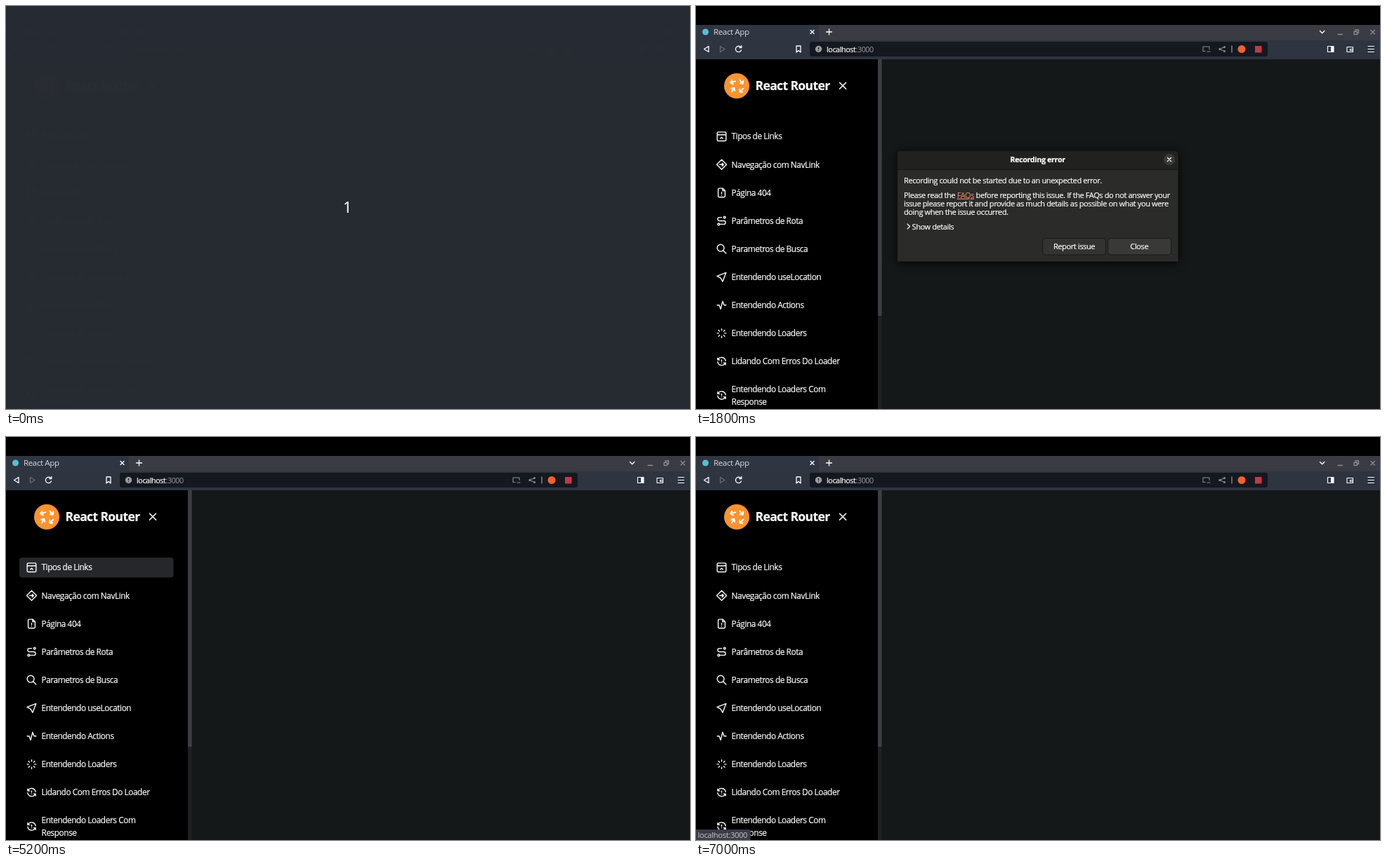
An HTML page that plays this animation: 974 by 575 pixels, repeating every 8000 ms.

```html
<!DOCTYPE html>
<html lang="pt">
<head>
<meta charset="utf-8">
<title>React App</title>
<style>
  html, body { margin: 0; width: 100%; height: 100%; overflow: hidden; background: #000; }
  svg { display: block; width: 974px; height: 575px; }
  text { font-family: "Open Sans", "Noto Sans", sans-serif; letter-spacing: -.035em; fill: #fff; stroke: #fff; stroke-width: .2; white-space: pre; }
  .soft { stroke: none; }
  .line { fill: none; stroke: #fff; stroke-width: 1.3; stroke-linecap: round; stroke-linejoin: round; }
  .icon { fill: none; stroke: #fff; stroke-width: 2; stroke-linecap: round; stroke-linejoin: round; }
  .dim { stroke: #8b8d92; }
  .mid { text-anchor: middle; }
</style>
</head>
<body>
<svg viewBox="0 0 974 575">
  <!-- browser frame -->
  <rect width="974" height="575"/>
  <rect y="27" width="974" height="23" fill="#3b3b43"/>
  <path d="M0 27H171q4 0 4 4V50H0z" fill="#2f3541"/>
  <rect y="49" width="974" height="27" fill="#2e3440"/>
  <rect x="162" y="51" width="652" height="21" rx="3" fill="#15181e"/>
  <circle cx="13.500" cy="37" r="4.500" fill="#53bfd8"/>
  <text class="soft" x="25" y="41" font-size="11.600" style="fill:#d9dbe0">React App</text>
  <g class="line">
    <path d="M163 34.500l5 5m0-5l-5 5M185.500 37h8m-4-4v8M888.500 35.500l3.200 3.200 3.200-3.200"/>
    <path class="dim" d="M914 40.500h6.500M961 34.500l5.500 5.500m0-5.500l-5.500 5.500M937 36.500h4.500v4h-4.500zM939 36v-2h4.500v4.500h-2"/>
    <path d="M18 57.500v8l-6.500-4zM143 57h6v9l-3-2.500-3 2.500z"/>
    <path d="M34.500 57.500v8l6.500-4z" stroke="#666b75"/>
    <path d="M64 59a4.200 4.200 0 1 0 .5 4M64.800 56.500v3h-3"/>
    <path class="dim" stroke-width="1.100" d="M725 64.500h-3v-6.500h9v3.500M728 65h4M752.500 58.500l-7 3 7 3"/>
    <path d="M899.500 57.500h8.500v8h-8.500zM927 58.500h8.500v7h-8.500zM931.500 61.500h4v2h-4zM957 57.500h8.500M957 61.500h8.500M957 65.500h8.500" stroke-width="1.100"/>
  </g>
  <g fill="#8b8d92">
    <circle cx="752.500" cy="58.500" r="1.500"/>
    <circle cx="745.800" cy="61.500" r="1.500"/>
    <circle cx="752.500" cy="64.500" r="1.500"/>
  </g>
  <path d="M904 57.500h4v8h-4z" fill="#fff"/>
  <path d="M763 56.500v10" stroke="#b5b7bc"/>
  <circle cx="174.500" cy="61.500" r="4.700" fill="#9a9ca1"/>
  <path d="M174.500 59v3m0 1.300v1" stroke="#15181e" stroke-width="1.200"/>
  <text x="186" y="65.500" font-size="10.700">localhost<tspan class="soft" fill="#9a9ca1">:3000</tspan></text>
  <circle cx="777" cy="61.500" r="5.500" fill="#f4602d"/>
  <rect x="796" y="57" width="9.500" height="9.500" fill="#c23a45"/>

  <!-- page -->
  <rect x="264" y="76" width="710" height="499" fill="#141819"/>
  <rect x="259" y="76" width="5.500" height="499" fill="#1e2123"/>
  <rect x="259" y="76" width="5.500" height="366" fill="#3d3f43"/>
  <circle cx="58" cy="114" r="18" fill="#fd932f"/>
  <path class="icon" transform="translate(46.200 101.800)" d="M20 21h-4v-4M16 21l5-5M6.500 9.500L3 7.500 5 4M3 7.500l6.800-1.900M4 16l4-1 1 4M8 15l-3.500 6M21 5l-.5 4-4-.5M20.500 9L16 3.500"/>
  <text x="84.500" y="120" font-size="17.500" font-weight="700">React Router</text>
  <path class="line" style="stroke-width:1.600" d="M204.500 109.300l9 9m0-9l-9 9"/>
  <rect id="hover" x="19" y="172" width="219.500" height="28.500" rx="4" fill="#25272a"/>
  <g id="menu"></g>
  <g id="status">
    <path id="bubble" fill="#3b3c44"/>
    <text id="link" class="soft" x="2.500" y="571.500" font-size="11.300" style="fill:#c3c5ca"></text>
  </g>

  <!-- recorder -->
  <rect id="veil" width="974" height="575" fill="#272c33"/>
  <text id="count" class="mid" x="486" y="295" font-size="21">1</text>
  <g id="hints" class="mid">
    <text x="486.700" y="147" font-size="10.400">1360 x 803</text>
    <text x="486.500" y="435.500" font-size="14">Start/Stop: Ctrl+Alt+R</text>
  </g>
  <g id="dialog" font-size="11">
    <rect x="286" y="206" width="401.500" height="160" rx="6" style="filter:drop-shadow(0 2px 6px #000b)"/>
    <path d="M286.500 365V212q0-5.500 5.500-5.500h389.500q5.500 0 5.500 5.500v153z" fill="#2b2b29" stroke="#111"/>
    <path d="M287 233V212q0-5 5-5h389.500q5 0 5 5v21z" fill="#212120"/>
    <path d="M287 233.500h399.500" stroke="#151514"/>
    <text class="mid" x="486.500" y="223.300" font-size="10.800" font-weight="700">Recording error</text>
    <circle id="cross" cx="674" cy="219" r="8"/>
    <path class="line" d="M671.500 216.500l5 5m0-5l-5 5"/>
    <text x="296" y="253">Recording could not be started due to an unexpected error.</text>
    <text x="296" y="273.700">Please read the <tspan class="soft" fill="#f08c6a" text-decoration="underline">FAQs</tspan> before reporting this issue. If the FAQs do not answer your</text>
    <text x="296" y="286">issue please report it and provide as much details as possible on what you were</text>
    <text x="296" y="298">doing when the issue occurred.</text>
    <path class="line" style="stroke-width:1.100" d="M301 311l3.500 3.500-3.500 3.500"/>
    <text x="307.500" y="318.700">Show details</text>
    <g stroke="#191918">
      <rect x="493.500" y="331.500" width="90" height="23.500" rx="4" fill="#333331"/>
      <rect id="close" x="586.500" y="331.500" width="90" height="23.500" rx="4"/>
    </g>
    <g class="mid">
      <text x="538.500" y="346.800">Report issue</text>
      <text x="631.300" y="346.800">Close</text>
    </g>
  </g>
</svg>
<script>
const el = id => document.getElementById(id);
const refresh = "M20 11A8.100 8.100 0 0 0 4.500 9M4 5v4h4M4 13a8.100 8.100 0 0 0 15.500 2M20 19v-4h-4M12 9v3M12 15v.1";
const items = [
  ["Tipos de Links", "M5 3h14q2 0 2 2v14q0 2-2 2H5q-2 0-2-2V5q0-2 2-2zM3 8.500h18M9.500 16l2.500-2.500 2.500 2.500"],
  ["Navegação com NavLink", "M12 2L22 12 12 22 2 12zM8 12h8M13 9l3 3-3 3"],
  ["Página 404", "M14 3v5h5M7 3h7l5 5v11q0 2-2 2H7q-2 0-2-2V5q0-2 2-2zM12 11v3M12 17v.1"],
  ["Parâmetros de Rota", "M4 19a2 2 0 1 0 4 0 2 2 0 1 0-4 0M16 5a2 2 0 1 0 4 0 2 2 0 1 0-4 0M8 19h8.500a3.500 3.500 0 0 0 0-7h-9a3.500 3.500 0 0 1 0-7H12"],
  ["Parametros de Busca", "M3 10a7 7 0 1 0 14 0 7 7 0 1 0-14 0M21 21l-6-6"],
  ["Entendendo useLocation", "M21 3l-7 18.300L10 14 2.700 10z"],
  ["Entendendo Actions", "M3 12h4l3 8 4-16 3 8h4"],
  ["Entendendo Loaders", "M12 6V3M16.200 7.800l2.200-2.200M18 12h3M16.200 16.200l2.200 2.200M12 18v3M7.800 16.200l-2.200 2.200M6 12H3M7.800 7.800L5.600 5.600"],
  ["Lidando Com Erros Do Loader", refresh],
  ["Entendendo Loaders Com", refresh]
];
const label = (text, y) => `<text x="50.500" y="${y}" font-size="11.800">${text}</text>`;
el("menu").innerHTML = items.map(([text, d], i) => {
  const y = 186.200 + 40.100 * i, iconY = i === 9 ? 555.500 : y;
  return `<path class="icon" transform="translate(28.100 ${iconY - 8.400}) scale(.7)" d="${d}"/>` + label(text, y + 4.200);
}).join("") + label("Response", 568.500);

const fade = (id, opacity) => el(id).setAttribute("opacity", opacity);
const paint = (id, color) => el(id).setAttribute("fill", color);
// Value of the last [start, value] step reached at time t
const at = (t, steps) => steps.filter(([start]) => t >= start).pop()[1];

function draw(t) {
  fade("veil", at(t, [[0, .993], [1700, .75], [1800, 0]]));
  fade("count", at(t, [[0, 1], [100, 0]]));
  fade("hints", at(t, [[0, 0], [100, 1], [1800, 0]]));
  fade("dialog", at(t, [[0, 0], [100, .6], [200, 1], [3100, .65], [3200, .2], [3300, 0]]));
  paint("close", at(t, [[0, "#333331"], [1000, "#363634"], [1100, "#393937"], [2500, "#363634"], [2600, "#333331"]]));
  paint("cross", at(t, [[0, "#3a3a39"], [2500, "#434342"], [2600, "#4b4b4a"]]));
  fade("hover", at(t, [[0, 0], [5200, 1], [5300, 0], [6300, 1], [6900, 0]]));
  fade("status", at(t, [[0, 0], [5700, .5], [5800, 1]]));
  el("link").textContent = "localhost:3000" + at(t, [[0, ""], [6400, "/tipos-links"], [7000, ""]]);
  const right = el("link").getComputedTextLength() + 4;
  el("bubble").setAttribute("d", `M0 560H${right}q3 0 3 3V575H0z`);
}

const start = performance.now();
(function frame() {
  draw((performance.now() - start) % 8000);
  requestAnimationFrame(frame);
})();
</script>
</body>
</html>
```
